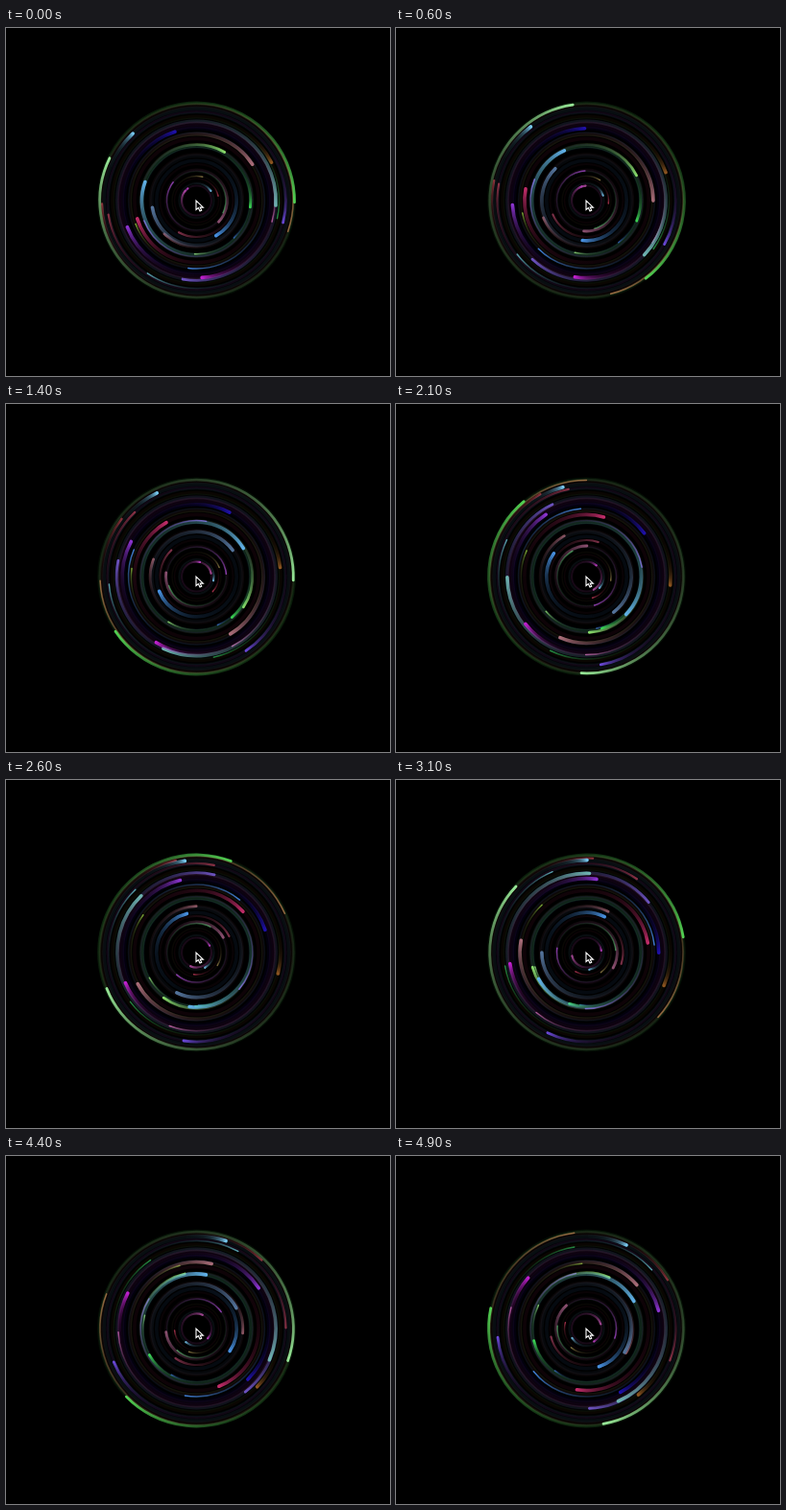
Recreate the animation shown at these times as an HTML page with a canvas. Size 400x363 px, loop 5 s.

```html
<!DOCTYPE html>
<html lang="en">
<head>
<meta charset="utf-8">
<title>Swirling trails</title>
<style>
html, body { margin: 0; width: 100%; height: 100%; overflow: hidden; background: #000; }
canvas { display: block; }
</style>
</head>
<body>
<canvas id="stage" width="400" height="363"></canvas>
<script>
const ctx = document.getElementById('stage').getContext('2d');
const CX = 198.5, CY = 180, LOOP = 5000, STEP = 100;
const FADE = 0.08;    // share of the run in which a trail drops to 1/e
const REACH = 4.5;    // trail length in fades
const GHOST = 0.07;   // light left behind on the track

// line width -> rings: colour, radius, start angle, degrees turned in one run
const rings = {
  1.5: [
    ['#9a5a38', 100.5, 18.7, 604], ['#b0588f', 81.6, 15.7, 180],
    ['#5aa8b0', 91.5, 124, 194], ['#208a44', 86, 12.5, 249],
    ['#3b7fd8', 71, 97, 404], ['#8cc860', 55.7, 92, 114],
    ['#7aa832', 68, 159, 107], ['#8048d0', 58.5, 159, 460],
    ['#3058a8', 55, 45, 82], ['#7a6a3c', 25.5, 284, 205],
    ['#3c9a50', 30.5, 25, 520], ['#a03048', 23, -12, 208],
    ['#8c3cb0', 31, 218, 521]
  ],
  2.2: [
    ['#8c3038', 93, 171, 210], ['#8a2c34', 98.5, 178, 151],
    ['#7c3048', 38, 119, 408], ['#a04890', 15.5, 221, 482],
    ['#b03cb8', 15.5, 234, 186], ['#6cb0d8', 18, 326, 181]
  ],
  2.8: [
    ['#50d050', 102, 1, 551], ['#98e898', 100.8, 206, 594],
    ['#8cdc64', 58.3, 300, 354], ['#6a48d8', 93, 14.3, 160],
    ['#6c4cc0', 83.3, 100, 348], ['#38d848', 56.3, 7, 160],
    ['#8c5460', 48.3, 134, 258], ['#8c5070', 32, 44, 545]
  ],
  3.6: [
    ['#78c8f0', 96.4, 226.5, 69], ['#1c10a8', 75.2, 252.6, 169.5],
    ['#8c5420', 87.6, 333, 79], ['#a86c78', 69.4, 327, 352],
    ['#60b0e8', 57, 200, 490], ['#6cb8b0', 82.6, 3.5, 423],
    ['#8c34d0', 77.3, 159, 187], ['#c020d0', 80.6, 86, 135],
    ['#c02c68', 64.6, 163, 296], ['#54749c', 46.6, 171, 581],
    ['#4890e0', 41.8, 61, 371]
  ]
};

// the spin starts slowly, then runs almost evenly
const times = [0, 600, 1400, 2100, 3100, 3900, 4900];
const turned = [0, 0.094, 0.263, 0.416, 0.635, 0.796, 1];

function progress(t) {
  let i = 1;
  while (i < times.length - 1 && t > times[i]) i++;
  const k = (t - times[i - 1]) / (times[i] - times[i - 1]);
  return turned[i - 1] + k * (turned[i] - turned[i - 1]);
}

const rad = deg => deg * Math.PI / 180;
const tint = (hex, alpha) => hex + Math.round(alpha * 255).toString(16).padStart(2, '0');

function arc(r, from, to, style) {
  ctx.beginPath();
  ctx.arc(CX, CY, r, from, to);
  ctx.strokeStyle = style;
  ctx.stroke();
}

function drawTrail([color, r, start, turn], s) {
  const head = rad(start + turn * s);
  const length = Math.min(rad(turn * FADE * REACH), 6);
  const tail = head - length;
  const share = length / (2 * Math.PI);
  const glow = ctx.createConicGradient(tail, CX, CY);
  for (let i = 0; i <= 12; i++) {
    const k = i / 12;
    glow.addColorStop(k * share, tint(color, Math.exp((k - 1) * REACH)));
  }
  glow.addColorStop(Math.min(share + 0.02 + 2 / r / 6, 0.99), color);
  glow.addColorStop(1, tint(color, 0));
  arc(r, tail, head, glow);
}

function drawCursor() {
  ctx.lineWidth = 1.1;
  ctx.lineJoin = 'miter';
  ctx.fillStyle = '#000';
  ctx.strokeStyle = '#fff';
  const arrow = new Path2D('M198 180v9.5l2.3-1.9 1.7 3.4 1.7-.8-1.5-3.1h3.2z');
  ctx.fill(arrow);
  ctx.stroke(arrow);
}

function draw(now) {
  const t = Math.floor(now % LOOP / STEP) * STEP;
  const s = progress(t);
  ctx.fillStyle = '#000';
  ctx.fillRect(0, 0, 400, 363);
  ctx.lineCap = 'round';
  for (const width in rings) {
    ctx.lineWidth = +width;
    for (const ring of rings[width]) {
      arc(ring[1], 0, 2 * Math.PI, tint(ring[0], GHOST));
      drawTrail(ring, s);
    }
  }
  drawCursor();
}

let begin;
function tick(now) {
  begin ??= now;
  draw(now - begin);
  requestAnimationFrame(tick);
}
draw(0);
requestAnimationFrame(tick);
</script>
</body>
</html>
```
